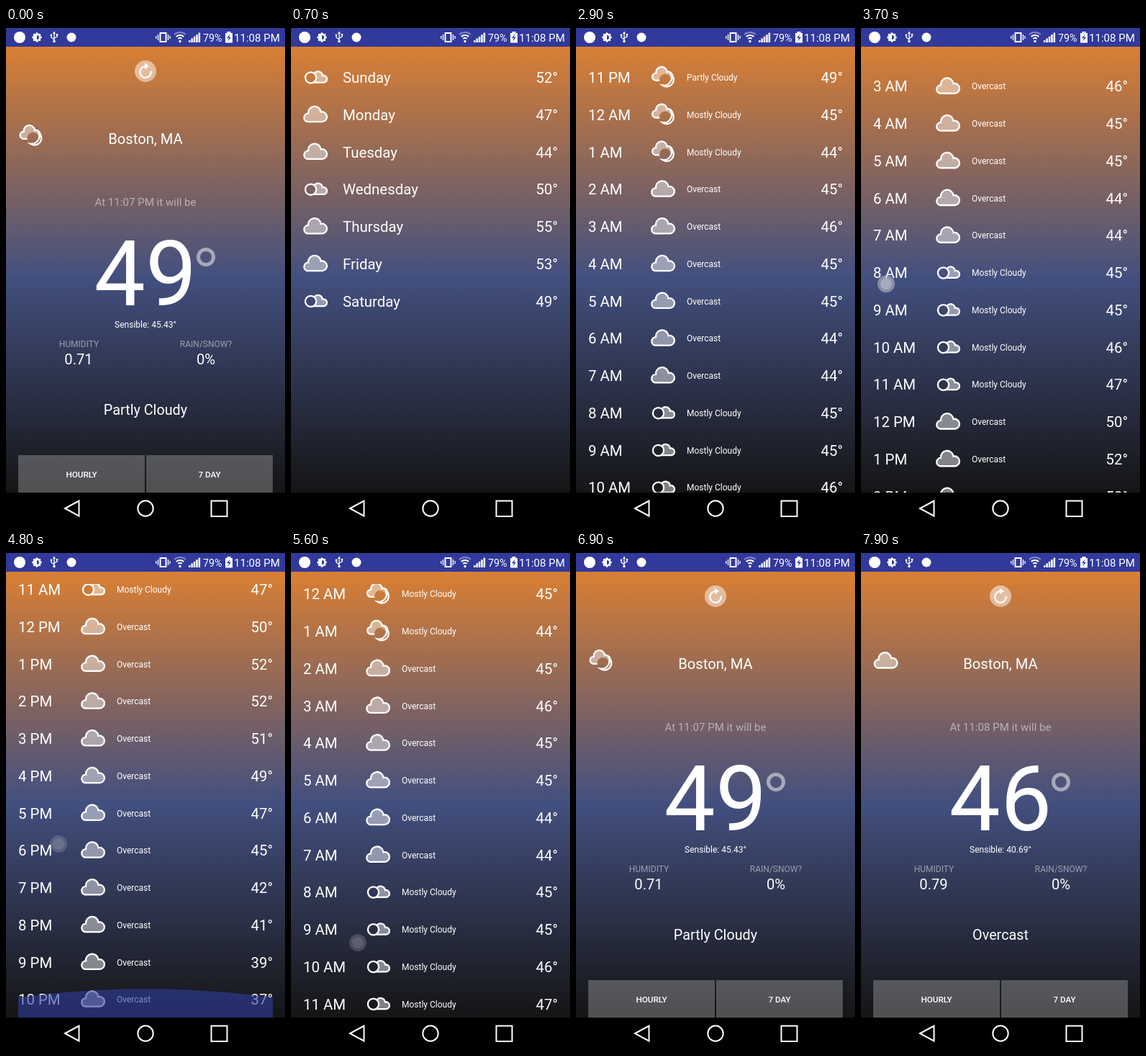
Recreate the animation shown at these times as an HTML page with a canvas. Size 388x690 px, loop 8000 ms.

```html
<!DOCTYPE html>
<html lang="en">
<head>
<meta charset="utf-8">
<title>Weather app</title>
<style>
html, body { margin: 0; width: 100%; height: 100%; overflow: hidden; background: #000; }
canvas { display: block; }
</style>
</head>
<body>
<canvas id="stage" width="388" height="690"></canvas>
<script>
const ctx = document.getElementById('stage').getContext('2d');
const LOOP = 8000, ROW = 51.75, TOP = 26, LIST_TOP = 43, BOTTOM = 645;
const WHITE = '#fff', FAINT = 'rgba(255,255,255,.5)';

const temps = [49, 45, 44, 45, 46, 45, 45, 44, 44, 45, 45, 46, 47, 50, 52, 52, 51, 49, 47, 45, 42, 41, 39, 37];
const hours = temps.map((temp, i) => {
  const h = (i + 23) % 24;
  const kind = i < 3 ? 'night' : i > 8 && i < 13 ? 'day' : 'cloud';
  const text = !i ? 'Partly Cloudy' : kind === 'cloud' ? 'Overcast' : 'Mostly Cloudy';
  return { label: `${h % 12 || 12} ${h < 12 ? 'AM' : 'PM'}`, kind, text, temp };
});
const dayTemps = [52, 47, 44, 50, 55, 53, 49];
const days = ['Sunday', 'Monday', 'Tuesday', 'Wednesday', 'Thursday', 'Friday', 'Saturday'];

// [time, scroll offset]
const scrollKeys = [[3400, 0], [3850, 291], [4150, 430], [4400, 460], [4720, 639], [4950, 639],
  [5100, 520], [5300, 330], [5400, 250], [5570, 80], [5600, 64], [5750, 0]];
// [start, end, x0, y0, x1, y1]
const touches = [[280, 400, 285, 620, 285, 620], [1600, 1740, 79, 675, 79, 675],
  [2620, 2700, 80, 620, 80, 620], [3400, 3850, 45, 550, 30, 259], [4400, 4750, 62, 600, 73, 404],
  [4950, 5100, 85, 300, 88, 420], [5400, 5550, 88, 360, 93, 541], [6350, 6480, 79, 675, 79, 675],
  [7200, 7320, 194, 60, 194, 60]];

const background = ctx.createLinearGradient(0, TOP, 0, BOTTOM);
background.addColorStop(0, '#d97f34');
background.addColorStop(.515, '#43507f');
background.addColorStop(1, '#151516');

const cloud = new Path2D('M-11 9.5A5.8 5.8 0 0 1-10-2A8.35 8.35 0 0 1 7.5-4A6.85 6.85 0 1 1 9.5 9.5Z');
const moon = new Path2D('M11-5A9.7 9.7 0 0 1-1 10.5A11 11 0 0 0 11-5Z');

const ramp = (t, a, b) => Math.max(0, Math.min(1, (t - a) / (b - a)));
const pulse = (t, a, b, c) => ramp(t, a, b) * (1 - ramp(t, b, c));

function scrollAt(t) {
  let s = 0;
  scrollKeys.forEach(([time, value], i) => {
    if (i) s += (value - scrollKeys[i - 1][1]) * ramp(t, scrollKeys[i - 1][0], time);
  });
  return s;
}

function text(str, x, y, size, align = 'center', color = WHITE, weight = 400) {
  ctx.font = `${weight} ${size}px Roboto, sans-serif`;
  ctx.textAlign = align;
  ctx.fillStyle = color;
  ctx.fillText(str, x, y);
}

function box(x, y, w, h, color) {
  ctx.fillStyle = color;
  ctx.fillRect(x, y, w, h);
}

function disc(x, y, r, color) {
  ctx.fillStyle = color;
  ctx.beginPath();
  ctx.arc(x, y, r, 0, 7);
  ctx.fill();
}

function ring(x, y, r, width, color = WHITE, from = 0, to = Math.PI * 2) {
  ctx.strokeStyle = color;
  ctx.lineWidth = width;
  ctx.beginPath();
  ctx.arc(x, y, r, from, to);
  ctx.stroke();
}

function path(d, fill, width = 0) {
  const p = new Path2D(d);
  if (fill) { ctx.fillStyle = fill; ctx.fill(p); }
  if (width) { ctx.strokeStyle = WHITE; ctx.lineWidth = width; ctx.stroke(p); }
}

function clipBox(x, y, w, h) {
  ctx.beginPath();
  ctx.rect(x, y, w, h);
  ctx.clip();
}

function drawCloud(x, y, scale) {
  ctx.save();
  ctx.translate(x, y);
  ctx.scale(scale, scale);
  ctx.fillStyle = 'rgba(255,255,255,.45)';
  ctx.fill(cloud);
  ctx.strokeStyle = WHITE;
  ctx.lineWidth = 2.3 / scale;
  ctx.stroke(cloud);
  ctx.restore();
}

// Draws a cloud with a round hole where the sun or moon stands
function maskedCloud(x, y, scale, hx, hy, r) {
  ctx.save();
  ctx.beginPath();
  ctx.rect(-30, -30, 60, 60);
  ctx.moveTo(hx + r, hy);
  ctx.arc(hx, hy, r, 0, 7);
  ctx.clip('evenodd');
  drawCloud(x, y, scale);
  ctx.restore();
}

function weatherIcon(kind, x, y) {
  ctx.save();
  ctx.translate(x, y);
  if (kind === 'cloud') {
    drawCloud(0, 0, 1);
  } else if (kind === 'day') {
    maskedCloud(4.5, 0, .72, -6.5, 0, 8);
    ring(-6.5, 0, 7.6, 2.3);
  } else {
    maskedCloud(-1, -4.5, .88, 3, 3, 8);
    ctx.strokeStyle = WHITE;
    ctx.lineWidth = 2.2;
    ctx.stroke(moon);
  }
  ctx.restore();
}

function refreshButton() {
  disc(194, 60, 15, FAINT);
  ring(194, 61, 7.8, 2.2, WHITE, -.15, Math.PI * 1.5);
  path('M193 48.5L199 53L193 57.5Z', WHITE);
}

function home(t) {
  const fresh = t >= 7500;
  refreshButton();
  weatherIcon(fresh ? 'cloud' : 'night', 34.5, 150);
  text('Boston, MA', 194, 161, 20.2);
  text(`At 11:0${fresh ? 8 : 7} PM it will be`, 194, 247, 15.1, 'center', FAINT);
  text(fresh ? '46' : '49', 194, 385, 127);
  ring(278, 318, 10.5, 5, FAINT);
  text(`Sensible: ${fresh ? '40.69' : '45.43'}°`, 194, 416, 12);
  text('HUMIDITY', 101.5, 443, 12, 'center', FAINT);
  text('RAIN/SNOW?', 278, 443, 12, 'center', FAINT);
  text(fresh ? '0.79' : '0.71', 101, 467, 20.2);
  text('0%', 278, 467, 20.2);
  text(fresh ? 'Overcast' : 'Partly Cloudy', 194, 537, 19.8);
  ['HOURLY', '7 DAY'].forEach((label, i) => {
    box(17 + i * 178, 593, 176, 52, 'rgba(255,255,255,.25)');
    text(label, 105 + i * 178, 623.5, 11.7, 'center', WHITE, 500);
  });
}

function edgeGlow(amount, atTop) {
  if (!amount) return;
  const edge = 40 * amount, r = 1311;
  disc(194, atTop ? LIST_TOP + edge - r : BOTTOM - edge + r, r, `rgba(48,63,159,${.6 * amount})`);
}

function hourly(t) {
  const first = LIST_TOP + ROW / 2 - scrollAt(t);
  hours.forEach((row, i) => {
    const y = first + i * ROW;
    if (y < 0 || y > 680) return;
    text(row.label, 17, y + 7.2, 20.4, 'left');
    weatherIcon(row.kind, 121, y);
    text(row.text, 154, y + 4.2, 12, 'left');
    text(row.temp + '°', 371, y + 7.2, 20.4, 'right');
  });
  edgeGlow(pulse(t, 4650, 4800, 5150), false);
  edgeGlow(pulse(t, 5700, 5850, 6200), true);
}

function weekly() {
  days.forEach((day, i) => {
    const y = LIST_TOP + ROW * (i + .5);
    weatherIcon(i % 3 ? 'cloud' : 'day', 34, y);
    text(day, 72, y + 7.2, 20.4, 'left');
    text(dayTemps[i] + '°', 371, y + 7.2, 20.4, 'right');
  });
}

// A screen that fades in while sliding up over the home screen
function overlay(amount, draw, t) {
  if (!amount) return;
  ctx.save();
  clipBox(0, TOP, 388, BOTTOM - TOP);
  ctx.globalAlpha = amount;
  ctx.translate(0, 40 * (1 - amount));
  box(0, TOP, 388, BOTTOM - TOP, background);
  clipBox(17, LIST_TOP, 354, BOTTOM - LIST_TOP);
  draw(t);
  ctx.restore();
}

function statusBar() {
  box(0, 0, 388, TOP, '#31399b');
  disc(19, 13, 8, WHITE);
  for (let i = 0; i < 8; i++) {
    const a = i * Math.PI / 4;
    disc(43 + 5 * Math.cos(a), 13 + 5 * Math.sin(a), 1.8, WHITE);
  }
  disc(43, 13, 5, WHITE);
  path('M43 10A3 3 0 0 1 43 16Z', '#31399b');
  path('M67 7V18M67 16L63 13V10M67 14L71 12V9', null, 1.3);
  path('M67 4.5L69 8H65Z', WHITE);
  disc(67, 18.5, 1.8, WHITE);
  disc(63, 10, 1.4, WHITE);
  box(69.8, 8, 2.4, 2.4, WHITE);
  disc(91, 13, 6.5, WHITE);

  path('M214.5 7H222.5V19H214.5Z', null, 2);
  path('M211.5 9V17M225.5 9V17M208.8 11V15M228 11V15', null, 1.3);
  [4, 8, 12].forEach(r => ring(242, 18, r, 2, r > 8 ? 'rgba(255,255,255,.4)' : WHITE, -2.3, -.85));
  disc(242, 18.5, 1.7, WHITE);
  for (let i = 0; i < 5; i++) box(254 + i * 3.4, 17 - i * 2.6, 2.5, 3 + i * 2.6, WHITE);
  text('79%', 274, 18.5, 14.3, 'left');
  path('M307.5 5H312.5V7H315V20.5H305V7H307.5Z', WHITE);
  path('M311.5 8.5L307 14H310L308.5 18.5L313 12.8H310Z', '#31399b');
  text('11:08 PM', 381, 18.8, 15.1, 'right');
}

function navBar(t) {
  box(0, BOTTOM, 388, 45, '#000');
  const press = Math.max(pulse(t, 1600, 1760, 2200), pulse(t, 6350, 6500, 6850));
  if (press) {
    ctx.fillStyle = `rgba(255,255,255,${.1 * press})`;
    ctx.beginPath();
    ctx.roundRect(34, BOTTOM, 114, 45, 22);
    ctx.fill();
  }
  path('M82 667L101.5 656.5V677.5Z', null, 2);
  ring(194, 667, 10.7, 2);
  path('M285.5 656.5H307.5V678H285.5Z', null, 2);
}

function drawTouches(t) {
  for (const [a, b, x0, y0, x1, y1] of touches) {
    const alpha = ramp(t, a - 90, a) * (1 - ramp(t, b, b + 90));
    if (!alpha) continue;
    const k = ramp(t, a, b), x = x0 + (x1 - x0) * k, y = y0 + (y1 - y0) * k;
    disc(x, y, 12, `rgba(205,205,215,${.5 * alpha})`);
    disc(x, y, 8, `rgba(235,235,240,${.3 * alpha})`);
  }
}

function frame(now) {
  const t = now % LOOP;
  box(0, 0, 388, 690, background);
  home(t);
  overlay(ramp(t, 400, 600) * (1 - ramp(t, 1650, 1790)), weekly, t);
  overlay(ramp(t, 2680, 2880) * (1 - ramp(t, 6450, 6650)), hourly, t);
  statusBar();
  navBar(t);
  drawTouches(t);
  requestAnimationFrame(frame);
}
requestAnimationFrame(frame);
</script>
</body>
</html>
```
